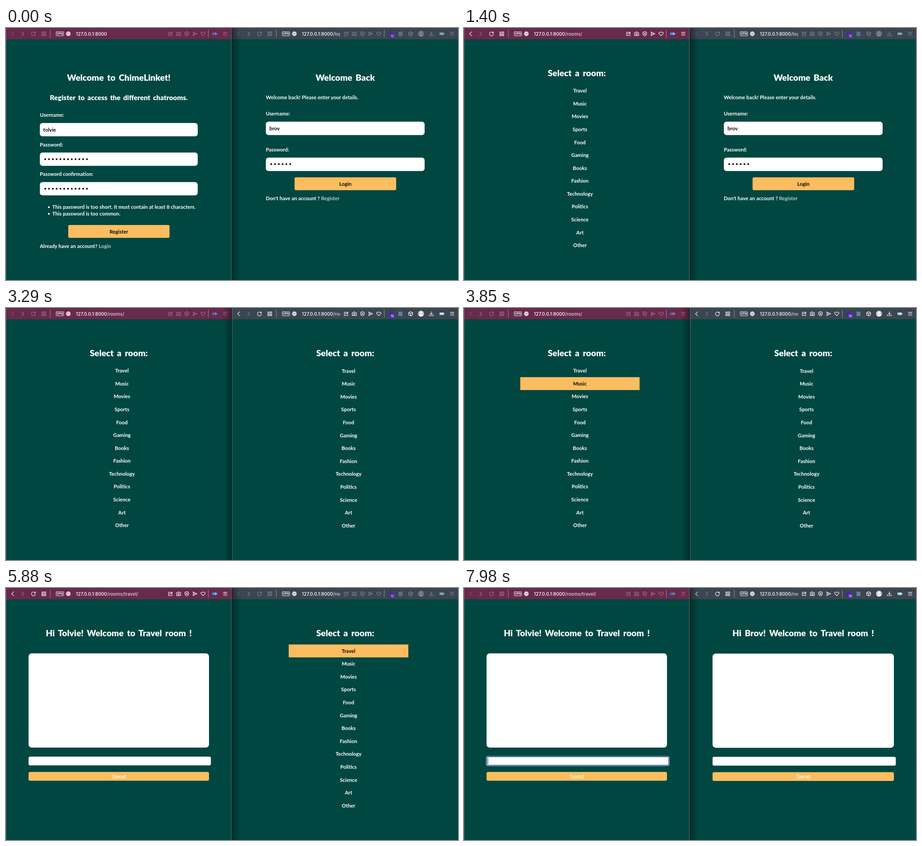
An HTML page that plays this animation: 1002x559 px, repeating every 8 s.

```html
<!DOCTYPE html>
<html lang="en">
<head>
<meta charset="utf-8">
<title>Chat rooms</title>
<style>
html, body { margin: 0; width: 100%; height: 100%; overflow: hidden; background: #004741; }
svg { display: block; width: 1002px; height: 559px; }
text { font: 700 11.3px Lato, sans-serif; fill: #fff; white-space: pre; }
.h1 { font-weight: 900; font-size: 19.2px; word-spacing: 3px; }
.h2 { font-weight: 900; font-size: 15.3px; word-spacing: 2.5px; }
.mid { text-anchor: middle; }
.dark { fill: #0a0a0a; }
.link { fill: #b5cac8; }
.url { font: 500 10.2px Inter, sans-serif; }
.path { fill: #fff; fill-opacity: .78; }
.tiny { font: 600 6.6px Inter, sans-serif; }
.send { font: 13.33px "Liberation Sans", Arial, sans-serif; }
.button { fill: #fbbd60; }
.hot .button { fill: #f9a72f; }
.row rect { fill: none; }
.row.hot rect { fill: #fbbd60; }
.row.hot text { fill: #0a0a0a; }
.icon { fill: none; stroke: #fff; stroke-width: 1.1; stroke-linecap: round; stroke-linejoin: round; }
.faint { opacity: .35; }
.dim .tool { opacity: .34; }
.dim .back { opacity: .2; }
.dim .faint { opacity: .42; }
.dim .power { opacity: .6; }
.dim .ext { opacity: .75; }
.off { display: none; }
</style>
</head>
<body>
<svg id="stage" viewBox="0 0 1002 559">
  <defs>
    <linearGradient id="shadeR"><stop stop-color="#000" stop-opacity=".36"/><stop offset=".5" stop-color="#000" stop-opacity=".13"/><stop offset="1" stop-opacity="0"/></linearGradient>
    <linearGradient id="shadeL"><stop stop-color="#000" stop-opacity="0"/><stop offset=".5" stop-color="#000" stop-opacity=".13"/><stop offset="1" stop-opacity=".36"/></linearGradient>
    <clipPath id="clipL"><rect x="150" width="205" height="25"/></clipPath>
    <clipPath id="clipR"><rect x="650" width="90.5" height="25"/></clipPath>
  </defs>
</svg>
<script>
const ROOMS = ['Travel', 'Music', 'Movies', 'Sports', 'Food', 'Gaming', 'Books',
  'Fashion', 'Technology', 'Politics', 'Science', 'Art', 'Other'];

const rect = (x, y, w, h, r = 0, attrs = 'fill="#fff"') =>
  `<rect x="${x}" y="${y}" width="${w}" height="${h}" rx="${r}" ${attrs}/>`;
const text = (x, y, body, cls = '') => `<text x="${x}" y="${y}" class="${cls}">${body}</text>`;
const group = (id, body, cls = '') => `<g id="${id}" class="${cls}">${body}</g>`;
const dots = (x, y, n) => Array.from({ length: n },
  (_, i) => `<circle cx="${x + i * 8.4}" cy="${y}" r="2" fill="#0a0a0a"/>`).join('');
const button = (id, x, y, w, label) => group(id,
  rect(x, y, w, 28.5, 3, 'class="button"') + text(x + w / 2, y + 18.6, label, 'mid dark'));

// Toolbar glyphs, each centred on 0,0
const GLYPHS = {
  back: 'M2.5-4.5L-2.5 0L2.5 4.5',
  forward: 'M-2.5-4.5L2.5 0L-2.5 4.5',
  reload: 'M3.7-2A4.3 4.3 0 1 0 4.3 .8M4.4-4.4V-1.6H1.6',
  stop: 'M-3.7-3.7L3.7 3.7M3.7-3.7L-3.7 3.7',
  grid: 'M-4.3-4.3h3.2v3.2h-3.2zM1.1-4.3h3.2v3.2h-3.2zM-4.3 1.1h3.2v3.2h-3.2zM1.1 1.1h3.2v3.2h-3.2z',
  globe: 'M-4.5 0A4.5 4.5 0 1 1 4.5 0A4.5 4.5 0 1 1-4.5 0H4.5M0-4.5C-2.8-1.5-2.8 1.5 0 4.5C2.8 1.5 2.8-1.5 0-4.5M-3.8-2H3.8M-3.8 2H3.8',
  share: 'M-.5-3.5H-4V4H3.7V1M-1.5 1.5C-1.3-1 .5-2.2 3.8-2.2M2-4.3L4.3-2.2L2-.2',
  camera: 'M-4.6-2.6H-2.2L-1.4-4H1.4L2.2-2.6H4.6V3.8H-4.6zM-1.8 .5A1.8 1.8 0 1 1 1.8 .5A1.8 1.8 0 1 1-1.8 .5',
  shield: 'M0-4.7L4-3.4V.5C4 2.5 2 4 0 4.8C-2 4-4 2.5-4 .5V-3.4zM-1.5-1.6L1.5 1.4M1.5-1.6L-1.5 1.4',
  plane: 'M-4.3-4L4.6 0L-4.3 4L-2.8 0zM-2.8 0H.6',
  heart: 'M0 4.4L-4 .4C-6-2-3.2-5.6 0-2.6C3.2-5.6 6-2 4 .4z',
  cube: 'M0-4.8L4.4-2.4V2.4L0 4.8L-4.4 2.4V-2.4zM-4.4-2.4L0 0L4.4-2.4M0 0V4.8',
  download: 'M0-4.5V1.5M-2.6-1L0 1.6L2.6-1M-4.5 2V4.2H4.5V2',
  menu: 'M-4-3.2H4M-4 0H4M-4 3.2H4'
};
const icon = (name, x, cls = 'tool', id = '') =>
  `<path ${id && `id="${id}"`} class="icon ${cls}" transform="translate(${x} 12.8)" d="${GLYPHS[name]}"/>`;
const line = x => rect(x, 4, 1, 17, 0, 'fill="#fff" fill-opacity=".45"');
const battery = (x, color) => `<g class="power">${rect(x - 5, 10, 9, 5.6, 1.2, `fill="${color}"`)}
  ${rect(x + 1, 10, 3.4, 5.6, 1, 'fill="#fff" fill-opacity=".45"')}${rect(x + 5, 11.6, 1.2, 2.4, .5)}</g>`;

function toolbar(side, x, shareX, color, extras) {
  const width = side === 'L' ? 500 : 501;
  const left = side === 'L' ? 0 : 501;
  const tools = ['share', 'camera', 'shield', 'plane', 'heart']
    .map((name, i) => icon(name, shareX + i * 18.1)).join('');
  return group('bar' + side, rect(left, 0, width, 25, 0, `fill="${color}"`) +
    icon('back', x, 'tool back') + icon('forward', x + 22.5, 'faint') +
    icon('reload', x + 46, 'tool', 'reload' + side) + icon('stop', x + 46, 'tool', 'stop' + side) +
    icon('grid', x + 69, 'tool') + line(x + 83) +
    rect(x + 96.5, 8.3, 16.5, 9, 1.2, 'class="icon" style="stroke-width:.9"') +
    text(x + 104.8, 15.2, 'VPN', 'tiny mid') + icon('globe', x + 123.5, '') +
    `<g clip-path="url(#clip${side})"><text x="${x + 140.3}" y="16.5" class="url">127.0.0.1:8000<tspan class="path" id="path${side}"></tspan></text></g>` +
    tools + extras);
}

const extrasL = line(448) + battery(462, '#1e9bff') + icon('menu', 486);
const extrasR = line(838) +
  `<g class="ext"><circle cx="852" cy="12.5" r="5" fill="#4c1fb0"/>` +
  rect(851.5, 13.5, 10, 8.5, 2, 'fill="#5a2bc0"') + text(856.5, 20.3, '12', 'tiny mid') +
  rect(870, 8, 9, 10, 1, 'fill="#5a7f9c"') + '</g>' + icon('cube', 897) +
  `<g class="tool"><circle cx="920" cy="12.5" r="6.8" fill="#c3c7cb"/><circle cx="920" cy="10.5" r="2.6" fill="#fff"/>
   <path d="M915.3 17C916 13 924 13 924.7 17Q920 20.5 915.3 17" fill="#fff"/></g>` +
  icon('download', 943) + battery(966, '#a6e2fb') + icon('menu', 989);

const registerView = group('registerL',
  text(250, 117, 'Welcome to ChimeLinket!', 'h1 mid') +
  text(250, 160, 'Register to access the different chatrooms.', 'h2 mid') +
  ['Username:', 'Password:', 'Password confirmation:'].map((label, i) =>
    text(75, 197 + i * 65.5, label) + rect(75, 210.7 + i * 65.5, 350, 29.5, 6)).join('') +
  text(82.5, 229.8, 'tolvie', 'dark') + dots(87, 291, 12) + dots(87, 356.5, 12) +
  ['This password is too short. It must contain at least 8 characters.', 'This password is too common.']
    .map((note, i) => `<circle cx="95" cy="${397.6 + i * 14.7}" r="2" fill="#fff"/>` + text(102.5, 401.2 + i * 14.7, note)).join('') +
  button('registerButton', 138, 437, 224.5, 'Register') +
  text(75, 488.3, 'Already have an account? <tspan class="link">Login</tspan>'));

const loginView = group('loginR',
  text(752, 117, 'Welcome Back', 'h1 mid') +
  text(576, 158, 'Welcome back! Please enter your details.') +
  text(576, 194.2, 'Username:') + rect(576, 207.8, 352, 29.7, 6) + text(584, 227, 'brov', 'dark') +
  text(576, 273.5, 'Password:') + rect(576, 287.5, 352, 29.7, 6) + dots(588, 302, 6) +
  button('loginButton', 639.7, 331.2, 225.2, 'Login') +
  text(576, 382.3, 'Don\'t have an account ? <tspan class="link">Register</tspan>'));

const listView = (side, headX, left, width, dy) => group('rooms' + side,
  text(headX, 106.6 + dy, 'Select a room:', 'h1 mid') +
  ROOMS.map((room, i) => {
    const y = 124.8 + dy + i * 28.58;
    return `<g class="row">${rect(left, y, width, 28.6, 0, '')}${text(left + width / 2, y + 18.4, room, 'mid')}</g>`;
  }).join(''));

const chatView = (side, name, x, width, dy) => group('chat' + side,
  text(x + width / 2, 106.6 + dy, `Hi ${name}! Welcome to Travel room !`, 'h1 mid') +
  rect(x, 145 + dy, width, 209, 7) + rect(x, 374 + dy, width + 4.2, 19.5, 3.5) +
  rect(x, 408 + dy, width, 19.6, 3.5, 'class="button"') +
  text(x + width / 2, 422.6 + dy, 'Send', 'send mid'));

const focusRing = group('focus',
  rect(48.8, 372.7, 406.8, 22, 4.5) +
  rect(50.2, 374.1, 404, 19.2, 3.5, 'fill="#fff" stroke="#17499b" stroke-width="1.6"') +
  rect(52.5, 377, 1, 13.5, 0, 'fill="#111"'));

const edge = (x, attrs) => rect(x, 0, 1, 559, 0, attrs);
const LIGHT = 'fill="#fff" fill-opacity=".28"';
const DARK = 'fill="#00221f"';

document.getElementById('stage').insertAdjacentHTML('beforeend',
  rect(0, 0, 1002, 559, 0, 'fill="#004741"') +
  toolbar('L', 14.7, 364.5, '#682a4c', extrasL) + toolbar('R', 515.7, 754, '#3a4651', extrasR) +
  registerView + loginView +
  listView('L', 250, 124.7, 264.6, 0) + listView('R', 752, 626.7, 265.2, .5) +
  chatView('L', 'Tolvie', 50, 400, 0) + chatView('R', 'Brov', 551, 402, .4) + focusRing +
  group('frontL', rect(501, 0, 21, 559, 0, 'fill="url(#shadeR)"') + edge(499, LIGHT) + edge(500, DARK)) +
  group('frontR', rect(479, 0, 21, 559, 0, 'fill="url(#shadeL)"') + edge(500, DARK) + edge(501, LIGHT)) +
  edge(0, 'fill="#fff" fill-opacity=".2"'));

// Each track is a list of [start in ms, value]
const LOOP = 8000;
const TRACKS = {
  viewL: [[0, 'register'], [1190, 'rooms'], [5460, 'chat']],
  viewR: [[0, 'login'], [3290, 'rooms'], [6790, 'chat']],
  pathL: [[0, ''], [1190, '/rooms/'], [5460, '/rooms/travel/']],
  pathR: [[0, '/login/'], [3290, '/rooms/']],
  active: [[0, ''], [700, 'L'], [2100, 'R'], [5110, 'L'], [6090, 'R']],
  front: [[0, 'L'], [2100, 'R'], [5110, 'L'], [6090, 'R'], [7840, 'L']],
  busyL: [[0, false], [770, true], [1260, false], [5180, true], [5460, false]],
  busyR: [[0, false], [2380, true], [3290, false], [6300, true], [6790, false]],
  hoverL: [[0, ''], [3780, 'Movies'], [3850, 'Music'], [4060, 'Travel']],
  hoverR: [[0, ''], [3710, 'Books'], [3780, ''], [5670, 'Travel']],
  register: [[0, false], [700, true]],
  login: [[0, false], [2170, true]],
  focus: [[0, false], [7910, true]]
};

const $ = id => document.getElementById(id);
const show = (id, on) => $(id).classList.toggle('off', !on);
const heat = (el, on) => el.classList.toggle('hot', on);

function render(t) {
  const now = {};
  for (const key in TRACKS) now[key] = TRACKS[key].filter(step => step[0] <= t).pop()[1];
  for (const side of 'LR') {
    for (const view of [side === 'L' ? 'register' : 'login', 'rooms', 'chat'])
      show(view + side, now['view' + side] === view);
    $('path' + side).textContent = now['path' + side];
    $('bar' + side).classList.toggle('dim', now.active !== side);
    show('front' + side, now.front === side);
    show('stop' + side, now['busy' + side]);
    show('reload' + side, !now['busy' + side]);
    $('rooms' + side).querySelectorAll('.row').forEach((row, i) => heat(row, ROOMS[i] === now['hover' + side]));
  }
  heat($('registerButton'), now.register);
  heat($('loginButton'), now.login);
  show('focus', now.focus);
}

const start = performance.now();
function tick() {
  render((performance.now() - start) % LOOP);
  requestAnimationFrame(tick);
}
tick();
</script>
</body>
</html>
```
